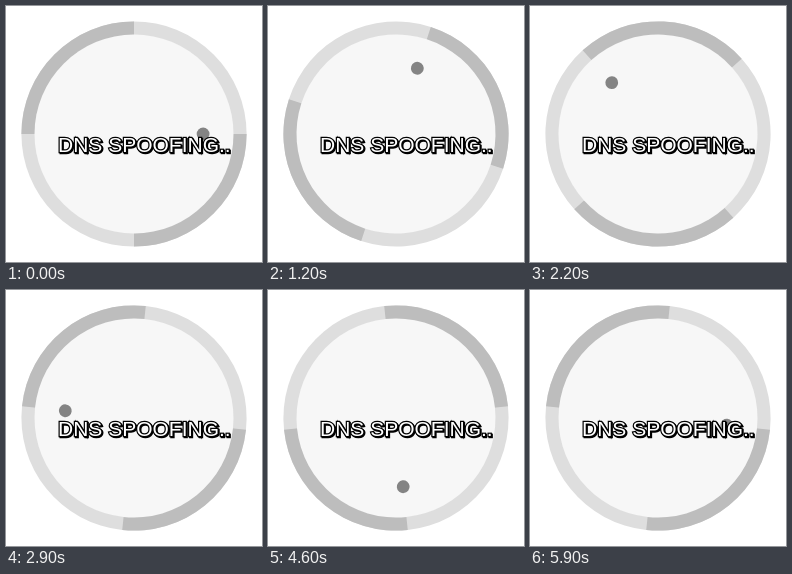
These frames come from a looping animation (256 px wide and 256 px high, 6000 ms). An HTML page:

```html
<!DOCTYPE html>
<html lang="en">
<head>
<meta charset="utf-8">
<title>Spinner</title>
<style>
  html, body { margin: 0; width: 100%; height: 100%; overflow: hidden; background: #fff; }
  svg { display: block; width: 100vw; height: 100vh; }
  text {
    font: 21px "Liberation Sans", Arial, sans-serif;
    fill: #fff; stroke: #000; stroke-width: 2.4px; paint-order: stroke;
    text-shadow: 1px 1px #000;
  }
</style>
</head>
<body>
<svg viewBox="0 0 256 256">
  <g id="wheel">
    <circle cx="128" cy="128" r="112.6" fill="#dedede"/>
    <path d="M128 128H15.4A112.6 112.6 0 0 1 128 15.4V240.6A112.6 112.6 0 0 0 240.6 128Z" fill="#bdbdbd"/>
    <circle cx="128" cy="128" r="99.5" fill="#f7f7f7"/>
    <circle cx="197.1" cy="128" r="6.4" fill="#848484"/>
  </g>
  <text x="52" y="145.5">DNS SPOOFING..</text>
</svg>
<script>
  const LOOP = 6000, STEP = 100;
  const wheel = document.getElementById("wheel");

  function draw() {
    const time = Math.floor(performance.now() % LOOP / STEP) * STEP;
    wheel.setAttribute("transform", `rotate(${-360 * time / LOOP} 128 128)`);
    requestAnimationFrame(draw);
  }
  draw();
</script>
</body>
</html>
```
